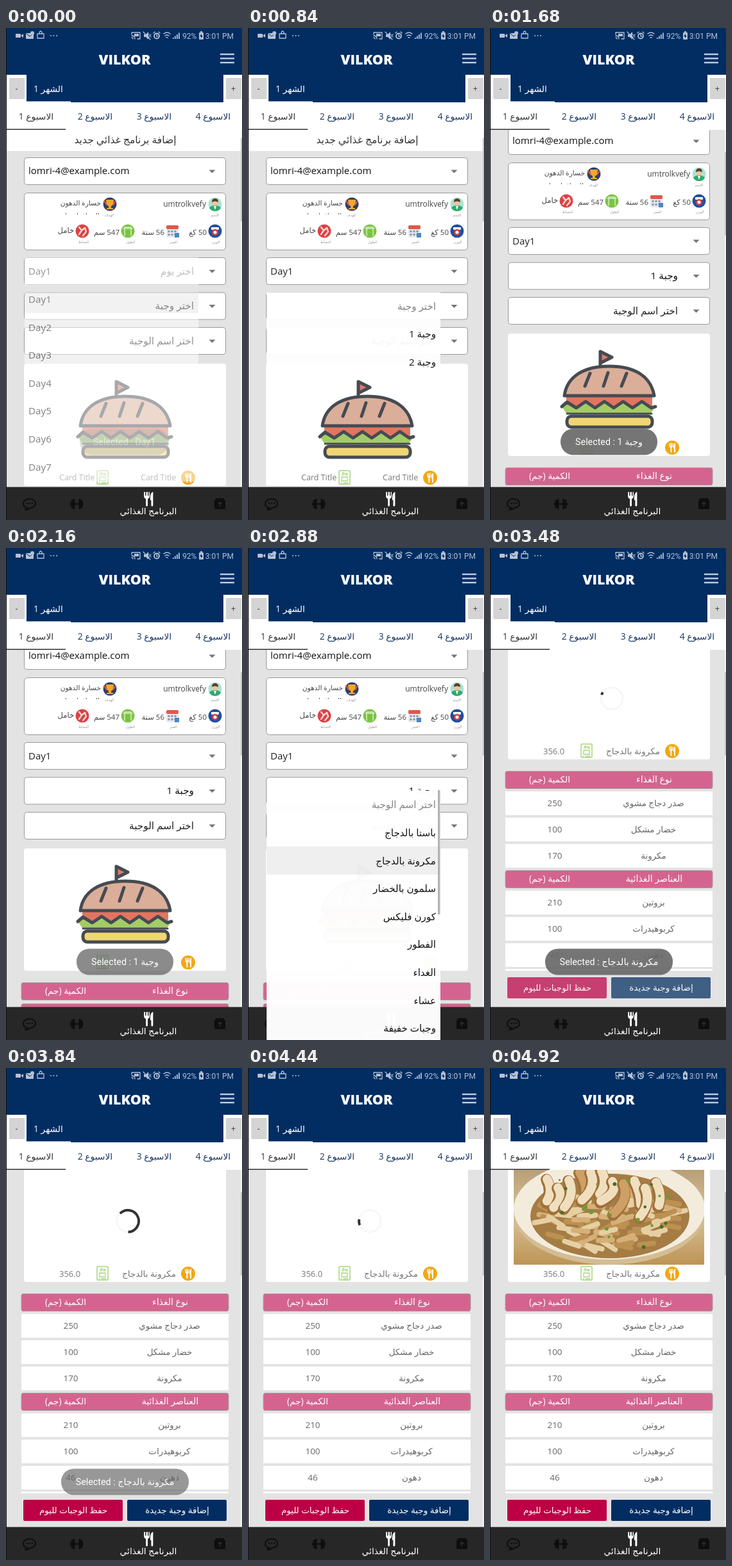
Write an HTML page that moves like this. It is 368 px wide and 768 px high and loops after 5040 ms.

```html
<!DOCTYPE html>
<html lang="ar">
<head>
<meta charset="utf-8">
<title>Meal planner</title>
<style>
html, body { margin: 0; width: 100%; height: 100%; overflow: hidden; background: #e3e3e3; }
svg { display: block; width: 368px; height: 768px; font-family: "Open Sans", "DejaVu Sans", sans-serif; }
</style>
</head>
<body>
<svg id="stage" viewBox="0 0 368 768" xmlns="http://www.w3.org/2000/svg"></svg>
<script>
const LOOP = 5040, NAVY = '#022d62', INK = '#464b52';
const ROBOTO = 'font-family="Roboto, DejaVu Sans, sans-serif"';

const rect = (x, y, w, h, fill, more = '') =>
  `<rect x="${x}" y="${y}" width="${w}" height="${h}" fill="${fill}" ${more}/>`;
const disc = (x, y, r, fill, more = '') => `<circle cx="${x}" cy="${y}" r="${r}" fill="${fill}" ${more}/>`;
const path = (d, fill, more = '') => `<path d="${d}" fill="${fill}" ${more}/>`;
const line = (d, color, width, more = '') =>
  path(d, 'none', `stroke="${color}" stroke-width="${width}" stroke-linecap="round" stroke-linejoin="round" ${more}`);
const group = (id, body, more = '') => `<g id="${id}" ${more}>${body}</g>`;

// align: l, m or r; y is the middle of the line
function text(x, y, s, size, fill, align = 'm', more = '') {
  const rtl = /^[^a-z]*[\u0600-\u06ff]/i.test(s);
  const anchor = align === 'm' ? 'middle' : (align === 'r') === rtl ? 'start' : 'end';
  return `<text x="${x}" y="${y + size * 0.35}" font-size="${size}" fill="${fill}" text-anchor="${anchor}" ` +
    `direction="${rtl ? 'rtl' : 'ltr'}" ${more}>${s}</text>`;
}

function cutlery(x, y, k, fill) {
  return `<g transform="translate(${x} ${y}) scale(${k})">` +
    path('M-7-11v7q0 3 3 4v10q0 2 1.5 2t1.500-2v-10q3-1 3-4v-7h-1.500v6h-1.500v-6h-2.500v6h-1.500v-6z', fill) +
    path('M7-11q-4 2-4 8v5h1.500v8q0 2 1.500 2t1.500-2v-21z', fill) + '</g>';
}

function select(y, extra) {
  return rect(28.5, y + 0.5, 314, 42, '#fff', 'rx="4" stroke="#999"') +
    path(`M316.500 ${y + 19.5}h10l-5 5z`, '#757575') + extra;
}

function statusBar() {
  const c = '#b4c1d3';
  return rect(15, 9, 8, 6, c, 'rx="1"') + path('M23 12l4-3v6z', c) +
    rect(31, 8, 12, 9, c, 'rx="1"') + line('M32 9l5 4 5-4', NAVY, 1) + disc(41, 8, 3, c) +
    line('M49 9h10v7h-10zM52 9q0-4 2-4t2 4', c, 1.3) +
    [70, 74.5, 79].map(x => disc(x, 12, 1, c)).join('') +
    line('M196 10v-3h13v10h-4M196 12q5 0 5 5M196 15q2 0 2 2', c, 1.3) + rect(200, 9, 7, 4, c) +
    path('M215 10h3l4-4v12l-4-4h-3z', c) + line('M214 6l11 12M223 10l3 4M226 10l-3 4', c, 1.2) +
    disc(235, 12.5, 4, 'none', `stroke="${c}" stroke-width="1.800"`) + line('M235 10v3h2M230 8l2-2M240 8l-2-2', c, 1.3) +
    line('M246 9q5-4 10 0M248 12q3-2 6 0M250 15q1-1 2 0', c, 1.4) +
    [0, 1, 2, 3].map(i => rect(260 + i * 3, 15 - i * 2.5, 1.8, 2 + i * 2.5, c)).join('') +
    text(275, 12.5, '92%', 12, c, 'l', ROBOTO) +
    rect(301, 7, 7, 11, c, 'rx="1"') + rect(303, 5, 3, 2, c) + path('M305 9l-3 4h2v3l3-4h-2z', NAVY) +
    text(355, 12.5, '3:01 PM', 12, c, 'r', ROBOTO);
}

function topBar() {
  const weeks = [47, 139, 231, 323];
  return rect(0, 0, 368, 73, NAVY) + statusBar() +
    text(185, 49, 'VILKOR', 21.5, '#fff', 'm', 'font-weight="800"') +
    [41, 47.5, 54].map(y => rect(334, y - 1.2, 22, 2.4, '#c0cde1')).join('') +
    rect(0, 73, 368, 86, '#fff') + rect(32, 72, 307, 44, NAVY) + rect(32, 114.5, 69, 2, '#fff') +
    [[5, '-'], [343, '+']].map(([x, s]) =>
      rect(x, 78, 24, 33, '#d4d4d4', 'rx="1"') + text(x + 11.5, 95, s, 12, '#333')).join('') +
    text(66, 95, 'الشهر 1', 13.8, '#fff') +
    weeks.map((x, i) => text(x, 138, 'الاسبوع ' + (i + 1), 13.8, i ? '#17365f' : '#333')).join('') +
    rect(1, 157.5, 92, 1.5, '#333');
}

function bottomBar() {
  const c = '#0e0e0e';
  return rect(0, 716.5, 368, 52, '#272727') +
    line('M37 735c-13 0-13 14-3 14l-4 3q6 0 8-3c11 0 11-14-1-14z', c, 2) +
    [33, 37, 41].map(x => disc(x, 742, 1.3, c)).join('') +
    line('M103 738v10M106 736v14M115 736v14M118 738v10', c, 3) + line('M100 743h20', c, 2.5) +
    cutlery(222, 735, 0.98, '#fff') +
    text(222, 754, 'البرنامج الغذائي', 13.8, '#fff') +
    rect(325, 736, 17, 15, c, 'rx="2"') + rect(327, 734, 13, 3, c) + line('M333.500 747v-6M330.500 743l3-3 3 3', '#2b2b2b', 1.5);
}

function profile() {
  const label = (x, y, s) => text(x, y, s, 5.5, '#999');
  const value = (x, y, s, size = 11.5) => text(x, y, s, size, '#444', 'r');
  return rect(28.5, 257.5, 314, 89, '#fff', 'rx="5" stroke="#999"') +
    disc(326, 275, 10.5, '#a9e3d4') + path('M317 281q2-4 9-4t9 4q-3 5-9 5t-9-5z', '#2faa6f') +
    disc(326, 273, 4.5, '#f3c29c') + path('M321 272q0-6 5-6t5 6q-5-3-10 0z', '#5a3b2a') + path('M324 278h4l-2 6z', '#fff') +
    value(312, 275, 'umtrolkvefy', 12) + label(326, 292, 'الإسم') +
    disc(162, 275, 10.5, '#2c3f6e') + path('M156 268h12q0 9-4 10v3h3v2h-10v-2h3v-3q-4-1-4-10z', '#f2a72d') +
    line('M153 270l4 6M171 270l-4 6', '#e2574c', 2) +
    value(148, 273, 'خسارة الدهون', 10.6) + label(161, 292, 'الهدف') +
    `<g clip-path="url(#slit)">${value(146, 293, 'المحافظة على', 10.6)}</g>` +
    disc(326, 317, 10.5, '#1f4fa0') + rect(320, 311, 12, 4, '#fff', 'rx="1"') + disc(326, 319, 5, '#d93c3c') + disc(326, 319, 2.5, '#fff') +
    value(313, 319, '50 كغ') + label(327, 334, 'الوزن') +
    rect(250, 308, 19, 19, '#e6e9ee', 'rx="2"') + rect(250, 308, 19, 6, '#e2574c', 'rx="2"') +
    [0, 1, 2, 3, 4, 5].map(i => rect(252.5 + i % 3 * 5, 316 + (i / 3 | 0) * 5, 3, 3, '#8a96a8')).join('') +
    rect(263, 320, 7, 7, '#4c86c6') +
    value(247, 319, '56 سنة') + label(261, 334, 'العمر') +
    disc(190, 317, 10.5, '#7cc344') + line('M185 324v-13h10v13M183 313h14', '#d8f0c4', 1.5) +
    value(177, 319, '547 سم') + label(194, 334, 'الطول') +
    disc(119, 317, 10.5, '#dc4245') + line('M114 311l4 5 5-4 2 6-5 6M118 316l-4 6', '#f6d9d3', 2.4) +
    value(106, 316, 'خامل') + label(121, 334, 'النشاط');
}

function burger() {
  let zig = 'M112 638L120 631';
  for (let i = 1; i <= 9; i++) zig += `L${120 + i * 14.6} ${i % 2 ? 640 : 630}`;
  zig += 'L258 638';
  return path('M172 552l18 9-18 9z', '#d9796f') + line('M172 575v-23l18 9-18 9', INK, 5) +
    rect(119, 622, 134, 18, '#e27560') + path(zig + 'L250 650H120z', '#a3cc66') +
    path('M116 621C120 591 146 575 186 575S251 591 256 621z', '#dbae99', `stroke="${INK}" stroke-width="5" stroke-linejoin="round"`) +
    line('M156 586l-8 20M184 585l-7 21M213 586l-8 20', INK, 5) +
    line(zig, INK, 5) + line('M120 649h132', INK, 3) +
    rect(120, 653, 133, 17, '#f0d672', `rx="7" stroke="${INK}" stroke-width="5"`);
}

function dish() {
  let seed = 11, s = '';
  const rnd = () => (seed = (seed * 16807) % 2147483647) / 2147483647;
  s += rect(37, 533, 297, 155, 'url(#table)');
  s += `<ellipse cx="186" cy="608" rx="149" ry="80" fill="#d3bd94"/><ellipse cx="186" cy="601" rx="149" ry="79" fill="#f3ecdd"/>`;
  s += `<ellipse cx="187" cy="612" rx="124" ry="66" fill="#a67c45"/>`;
  for (let i = 0; i < 90; i++) {
    const a = rnd() * 6.283, r = Math.sqrt(rnd());
    const x = 187 + Math.cos(a) * r * 108, y = 617 + Math.sin(a) * r * 52, v = rnd() * 3;
    s += line(`M${x - 11} ${y - 7 + v * 2}l22 ${14 - 8 * v}`, ['#d6b079', '#bd9053', '#e6cfa3'][i % 3], 8);
  }
  for (let i = 0; i < 11; i++) {
    const x = 88 + i * 17, y = 542 + rnd() * 28, dx = 14 - rnd() * 34, dy = 30 + rnd() * 22;
    s += line(`M${x} ${y}q10 ${dy / 2} ${dx} ${dy}`, '#a0713b', 18) +
      line(`M${x + 1} ${y - 1}q10 ${dy / 2} ${dx} ${dy - 2}`, i % 4 === 3 ? '#cfa066' : '#f0dfbf', 14);
  }
  for (let i = 0; i < 24; i++)
    s += disc(95 + rnd() * 185, 555 + rnd() * 110, 1.5 + rnd() * 2, i % 3 ? '#6f9a32' : '#47701f');
  return `<g clip-path="url(#photo)">${s}</g>`;
}

const tableHead = (y, s) => rect(24, y + 0.5, 323, 27, '#d4648f', 'rx="3" stroke="#a59a9a"') +
  text(256, y + 13, s, 14, '#fff') + text(93, y + 13, 'الكمية (جم)', 13.7, '#fff');
const tableRow = (y, [name, n]) => rect(24, y, 323, 37, '#fff') +
  text(255, y + 18, name, 13.4, '#666') + text(101, y + 18, n, 13.4, '#666');
const foods = [['صدر دجاج مشوي', '250'], ['خضار مشكل', '100'], ['مكرونة', '170']];
const nutrients = [['بروتين', '210'], ['كربوهيدرات', '100'], ['دهون', '46']];

function page() {
  const gray = '#777';
  return rect(0, 159, 368, 33, '#fff') + text(186, 175, 'إضافة برنامج غذائي جديد', 15.6, '#333') +
    select(202, text(35, 223, 'lomri-4@example.com', 15, '#111', 'l')) + profile() +
    select(358, text(35, 380, 'Day1', 15, '#222', 'l')) +
    select(412.5, group('mealHint', text(293, 434, 'اختر وجبة', 15.3, '#222', 'r')) +
      group('mealPick', text(293, 434, 'وجبة 1', 15.3, '#111', 'r'))) +
    select(467, group('dishHint', text(293, 489, 'اختر اسم الوجبة', 15.3, '#222', 'r')) +
      group('dishPick', text(293, 489, 'مكرونة بالدجاج', 15.3, '#111', 'r'))) +
    rect(28, 524, 315, 191, '#fff', 'rx="4"') + group('burger', burger()) +
    group('spinner', disc(190, 620, 17, 'none', 'stroke="#f7f7f7" stroke-width="3"') +
      '<path id="arc" fill="none" stroke="#333" stroke-width="4"/>') +
    group('dish', dish()) +
    group('cardHint', text(83, 702, 'Card Title', 12.5, gray, 'l') + text(210, 702, 'Card Title', 12.5, gray, 'l')) +
    group('cardInfo', text(83, 702, '356.0', 13, gray, 'l') + text(265, 702, 'مكرونة بالدجاج', 13.6, gray, 'r')) +
    rect(142, 691, 17, 21, 'none', 'rx="1" stroke="#a5d67b" stroke-width="1.500"') +
    line('M146 701h9v6h-9zM145 710h1M149 710h7M147 698q0-4 2-4t0 4M152 695l3 3M155 695l-3 3', '#a5d67b', 1.3) +
    disc(284, 702, 11, '#f3a712') + cutlery(284, 702, 0.66, '#fff') +
    group('emptyTables', tableHead(733, 'نوع الغذاء') + tableHead(766, 'العناصر الغذائية')) +
    group('fullTables', tableHead(733, 'نوع الغذاء') + foods.map((f, i) => tableRow(765 + 41 * i, f)).join('') +
      tableHead(888, 'العناصر الغذائية') + nutrients.map((n, i) => tableRow(920 + 41 * i, n)).join('') +
      rect(24, 1042, 323, 3, '#fff') +
      group('buttons', rect(27, 1055, 155, 33, '#bd0045', 'rx="2"') + rect(189, 1055, 155, 33, NAVY, 'rx="2"') +
        text(105, 1071, 'حفظ الوجبات لليوم', 13.4, '#fff') + text(267, 1071, 'إضافة وجبة جديدة', 13.5, '#fff')));
}

function popup(id, top, height, items, marked, tint) {
  const pitch = 43.6;
  return group(id, rect(29, top, 271, height, '#fff') +
    (marked ? rect(29, top + marked * pitch, 271, pitch, tint) : '') +
    items.map((s, i) => text(/^D/.test(s) ? 35 : 293, top + 22 + i * pitch, s, 15.2, i ? '#111' : '#858585',
      /^D/.test(s) ? 'l' : 'r')).join(''));
}

const toast = (id, x, w, s) => group(id, rect(x, 625.5, w, 41, '#666', 'rx="20" fill-opacity=".9"') +
  text(x + w / 2, 646, 'Selected : ' + s, 14.3, '#fff', 'm', ROBOTO));

const days = ['اختر يوم', ...Array.from({ length: 7 }, (_, i) => 'Day' + (i + 1))];
const dishes = ['اختر اسم الوجبة', 'باستا بالدجاج', 'مكرونة بالدجاج', 'سلمون بالخضار', 'كورن فليكس',
  'الفطور', 'الغداء', 'عشاء', 'وجبات خفيفة'];

document.getElementById('stage').innerHTML =
  `<defs><clipPath id="view"><rect y="159" width="368" height="558"/></clipPath>
  <clipPath id="photo"><rect x="37" y="533" width="297" height="155"/></clipPath>
  <clipPath id="slit"><rect x="80" y="287" width="70" height="4"/></clipPath>
  <linearGradient id="table" x1="0" y1="0" x2="0" y2="1"><stop offset="0" stop-color="#b59b73"/>
  <stop offset=".5" stop-color="#d9c39a"/><stop offset="1" stop-color="#bd9455"/></linearGradient></defs>` +
  rect(0, 0, 368, 768, '#e3e3e3') +
  `<g clip-path="url(#view)">${group('page', page())}` +
  `${rect(366, 159, 2, 558, '#f4f4f4')}${rect(366, 172, 2, 130, '#c6c6c6', 'id="bar"')}</g>` +
  topBar() + bottomBar() +
  toast('toastDay', 115, 139, 'Day1') + toast('toastMeal', 110, 151, 'وجبة 1') + toast('toastDish', 86, 199, 'مكرونة بالدجاج') +
  popup('dayList', 358, 350, days, 1, '#e6e6e6') +
  popup('mealList', 412.5, 131, ['اختر وجبة', 'وجبة 1', 'وجبة 2'], 0) +
  popup('dishList', 379, 389, dishes, 2, '#efefef') +
  group('listBar', rect(296, 378, 3.5, 194, '#b3b3b3')) + rect(0, 0, 1, 768, '#111');

const parts = {};
document.querySelectorAll('[id]').forEach(el => parts[el.id] = el);
const fade = (id, a) => {
  parts[id].setAttribute('opacity', a);
  parts[id].style.display = a > 0 ? '' : 'none';
};
const ramp = (t, a, b) => Math.min(1, Math.max(0, (t - a) / (b - a)));
const ease = (t, a, b) => { const u = ramp(t, a, b); return u * u * (3 - 2 * u); };
const pulse = (t, a, b, c, d) => ramp(t, a, b) * (1 - ramp(t, c, d));

function spin(t) {
  const u = (((t - 3480) / 1040) % 1 + 1) % 1, turn = (t - 3480) * 0.068;
  const tail = 200 + turn + 270 * ease(u, 0.5, 1), head = 214 + turn + 270 * ease(u, 0, 0.5);
  const at = deg => { const r = deg * Math.PI / 180; return `${190 + 17 * Math.cos(r)} ${620 + 17 * Math.sin(r)}`; };
  parts.arc.setAttribute('d', `M${at(tail)}A17 17 0 ${head - tail > 180 ? 1 : 0} 1 ${at(head)}`);
}

function draw(t) {
  const scroll = 47 * ease(t, 1320, 1650) + 8 * ease(t, 1800, 2000) + 330 * ease(t, 3180, 3460) - 4 * ease(t, 3500, 3700);
  parts.page.setAttribute('transform', `translate(0 ${-scroll})`);
  parts.bar.setAttribute('y', 172 + Math.min(22, scroll * 0.47));
  const meal = t >= 1240 ? 1 : 0, chosen = t >= 3080 ? 1 : 0;
  fade('mealHint', 1 - meal);
  fade('mealPick', meal);
  fade('dishHint', 1 - chosen);
  fade('dishPick', chosen);
  fade('cardHint', 1 - meal);
  fade('cardInfo', chosen);
  fade('burger', 1 - chosen);
  fade('emptyTables', 1 - chosen);
  fade('fullTables', chosen);
  fade('buttons', 0.72 + 0.28 * ramp(t, 3480, 3600));
  const loaded = ramp(t, 4480, 4760);
  fade('spinner', chosen * (1 - loaded));
  fade('dish', loaded);
  spin(t);
  fade('dayList', 0.52 * (1 - ramp(t, 0, 140)));
  fade('mealList', 0.96 * pulse(t, 680, 840, 1200, 1320));
  const list = 0.98 * pulse(t, 2440, 2520, 2980, 3110);
  fade('dishList', list);
  fade('listBar', list);
  fade('toastDay', (0.45 + 0.55 * ramp(t, 0, 160)) * (1 - ramp(t, 500, 740)));
  fade('toastMeal', pulse(t, 1260, 1440, 2120, 2380));
  fade('toastDish', pulse(t, 3060, 3240, 3780, 4020));
}

const start = performance.now();
function tick() {
  draw((performance.now() - start) % LOOP);
  requestAnimationFrame(tick);
}
draw(0);
requestAnimationFrame(tick);
</script>
</body>
</html>
```
